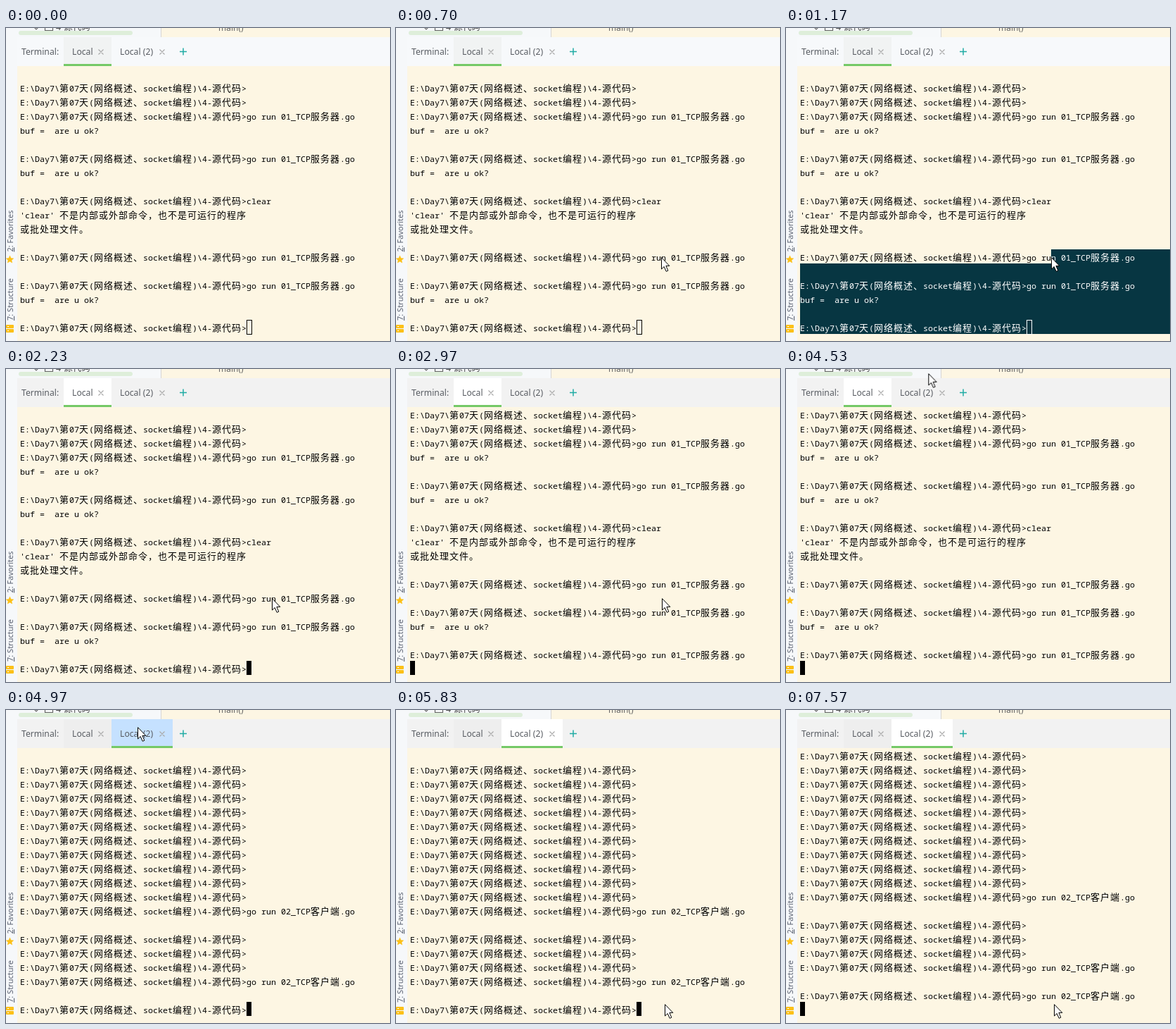
Write an HTML page that moves like this. It is 546 by 444 pixels and loops after 8000 ms.

```html
<!DOCTYPE html>
<html lang="zh">
<head>
<meta charset="utf-8">
<title>Terminal</title>
<style>
  html, body { margin: 0; width: 100%; height: 100%; overflow: hidden; background: #fdf6e3; }
  #stage { position: relative; width: 546px; height: 444px; overflow: hidden; background: #fdf6e3; }
  #stage > *, .view { position: absolute; }

  /* every moving part shares one 8 s clock; most changes are hard */
  .view, .typed, #caret, #mouse, #head, #tab1, #tab2, #line {
    animation-duration: 8s; animation-iteration-count: infinite; animation-timing-function: step-end;
  }

  #chrome { left: 0; top: 0; font-family: "Noto Sans", "Open Sans", "Noto Sans CJK SC", sans-serif; }
  .label { font-size: 12.2px; fill: #595d63; }
  .side { font-size: 11px; fill: #596070; }
  .num { text-decoration: underline; }

  #term { left: 15px; top: 54px; width: 531px; height: 390px; overflow: hidden; }
  .view { inset: 0; color: #000; font: 500 11.667px "Noto Sans Mono", "DejaVu Sans Mono", monospace; }
  .view p { margin: 0; padding-left: 5px; height: 20px; line-height: 23px; white-space: pre; }
  .view b { font: 13px "Noto Sans CJK TC", "Noto Sans CJK SC", sans-serif; line-height: 0; letter-spacing: 1px; }
  .typed { font-style: normal; }
  #server { animation-name: server; }
  #client { animation-name: client; }
  #server .typed { animation-name: typeServer; }
  #client .typed { animation-name: typeClient; }
  #picked {
    animation-name: picked; background: #073642; color: #fff;
    clip-path: polygon(362px 260px, 531px 260px, 531px 380px, 5px 380px, 5px 280px, 362px 280px);
  }
  #picked .typed { opacity: 0; }

  #caret { left: 0; top: 414px; box-sizing: border-box; border: 1px solid #000; animation-name: caret; }
  #mouse { left: -1px; top: -1px; overflow: visible; animation-name: path, appear; animation-timing-function: linear, step-end; }
  #head { animation-name: head; }
  #tab1 { animation-name: tab1; }
  #tab2 { animation-name: tab2; }
  #line { left: 0; top: 51px; height: 3px; background: #75c967; animation-name: line; }

  @keyframes server {
    0% { opacity: 1; transform: none; }
    37.125% { transform: translateY(-20px); }
    60.875%, 100% { opacity: 0; }
  }
  @keyframes client {
    0% { opacity: 0; transform: none; }
    60.875% { opacity: 1; }
    94.625%, 100% { transform: translateY(-20px); }
  }
  @keyframes typeServer { 0% { opacity: 0; } 28.75%, 100% { opacity: 1; } }
  @keyframes typeClient { 0% { opacity: 0; } 87.5%, 100% { opacity: 1; } }
  @keyframes picked { 0% { opacity: 0; } 14.625% { opacity: 1; } 15%, 100% { opacity: 0; } }

  @keyframes caret {
    0% { transform: translateX(342px); width: 8px; height: 21px; background: transparent; border-color: #000; opacity: 1; }
    14.625% { border-color: #fff; }
    15% { width: 7px; height: 20px; background: #000; border-color: #000; }
    20.875% { opacity: 0; }
    27.875% { opacity: 1; }
    28.75% { transform: translateX(496px); }
    35.375% { opacity: 0; }
    37.125% { transform: translateX(20px); opacity: 1; }
    46% { opacity: 0; }
    53% { opacity: 1; }
    60.875% { transform: translateX(342px); width: 8px; height: 21px; background: transparent; }
    62.125% { width: 7px; height: 20px; background: #000; }
    75% { opacity: 0; }
    81.625% { opacity: 1; }
    87.5% { transform: translateX(496px); }
    93.75% { opacity: 0; }
    94.625%, 100% { transform: translateX(20px); width: 7px; height: 20px; background: #000; border-color: #000; opacity: 1; }
  }

  @keyframes appear { 0% { opacity: 0; } 3.75%, 100% { opacity: 1; } }
  @keyframes path {
    0%, 3.75% { transform: translate(518px, 217px); }
    6.25% { transform: translate(420px, 300px); }
    7.75% { transform: translate(360px, 335px); animation-timing-function: ease-out; }
    8.75%, 18.37% { transform: translate(378px, 326px); }
    18.375%, 43.74% { transform: translate(379px, 326px); }
    43.75%, 44.12% { transform: translate(378px, 318px); }
    44.125%, 45.5% { transform: translate(376px, 312px); animation-timing-function: ease-in-out; }
    50%, 52.6% { transform: translate(240px, 116px); }
    55% { transform: translate(222px, 40px); }
    56.5% { transform: translate(205px, 5px); animation-timing-function: ease-out; }
    58.75%, 65% { transform: translate(188px, 25px); animation-timing-function: ease-in; }
    68.5% { transform: translate(305px, 240px); }
    70.75% { transform: translate(390px, 398px); animation-timing-function: ease-out; }
    72.875%, 74.99% { transform: translate(383px, 418px); }
    75%, 100% { transform: translate(382px, 418px); }
  }

  /* the header is paler until the terminal takes the focus */
  @keyframes head { 0% { fill: #f7f9fb; } 15%, 100% { fill: #f2f2f2; } }
  @keyframes tab1 { 0% { fill: #f1f3f3; } 15% { fill: #fff; } 60.875%, 100% { fill: #eee; } }
  @keyframes tab2 { 0% { fill: transparent; } 58% { fill: #c5e1ff; } 66.25%, 100% { fill: #fff; } }
  @keyframes line {
    0% { transform: translateX(82px); width: 68px; }
    60.875%, 100% { transform: translateX(150px); width: 87px; }
  }
</style>
</head>
<body>
<div id="stage">
  <div id="term">
    <div class="view" id="server"></div>
    <div class="view" id="picked"></div>
    <div class="view" id="client"></div>
  </div>
  <div id="caret"></div>

  <svg id="chrome" width="546" height="444">
    <!-- project tree and editor edge -->
    <rect width="220" height="14" fill="#f6f8fa"/>
    <rect y="13" width="16" height="431" fill="#f6f8fa"/>
    <rect x="18" y="4" width="162" height="6" rx="3" fill="#deeeda"/>
    <path d="M220.5 0V13" stroke="#d5d5d5"/>
    <path d="M40 -1L43 2L46 -1M55.5 -4V3.5H66.5V-4" fill="none" stroke="#666" stroke-width="1.2"/>
    <text x="71" y="3.4" font-size="12.5" fill="#444">4-源代码</text>
    <text x="302" y="4.4" font-size="12" fill="#666">main()</text>

    <!-- terminal header -->
    <rect id="head" x="16" y="13" width="530" height="41"/>
    <rect id="tab1" x="82" y="13" width="68" height="41"/>
    <rect id="tab2" x="150" y="13" width="87" height="41"/>
    <g class="label">
      <text x="22" y="38">Terminal:</text>
      <text x="94" y="38">Local</text>
      <text x="162" y="38">Local (2)</text>
    </g>
    <path d="M131.5 30.5l7 7m0 -7l-7 7M218.5 30.5l7 7m0 -7l-7 7" stroke="#aaa" stroke-width="1.2"/>
    <path d="M247 33.5h10M252 28.5v10" stroke="#21aca5" stroke-width="1.5"/>

    <!-- side bar -->
    <g class="side">
      <text transform="translate(10 317.5) rotate(-90)"><tspan class="num">2</tspan>: Favorites</text>
      <text transform="translate(10 415) rotate(-90)"><tspan class="num">7</tspan>: Structure</text>
    </g>
    <g fill="#fcc017">
      <path d="M5.5 322.5l1.7 3.8 4.1.4 -3.1 2.7 .9 4 -3.6-2.1 -3.6 2.1 .9-4 -3.1-2.7 4.1-.4z"/>
      <rect y="421" width="11" height="5" rx="1"/>
      <rect y="427" width="11" height="5" rx="1"/>
    </g>
    <path d="M2 423.5h2M2 429.5h2" stroke="#fff"/>
  </svg>

  <div id="line"></div>
  <svg id="mouse" width="13" height="22">
    <path d="M.5 .7V17L4.2 13.5L7.2 20.3L9.8 19.2L6.9 12.4H11.8Z" fill="#fff" stroke="#000"/>
  </svg>
</div>

<script>
  const prompt = 'E:\\Day7\\第07天(网络概述、socket编程)\\4-源代码>';
  const runServer = 'go run 01_TCP服务器.go';
  const runClient = 'go run 02_TCP客户端.go';
  const reply = 'buf =  are u ok?';

  // CJK runs get their own font so that they fill two cells per character
  const cells = s => s.replace(/[^\x00-\x7f]+/g, '<b>$&</b>');
  const row = s => `<p>${cells(s)}</p>`;

  function fill(id, lines, command) {
    document.getElementById(id).innerHTML = lines.map(row).join('') +
      `<p>${cells(prompt)}<i class="typed">${cells(command)}</i></p>`;
  }

  const serverLines = [
    '', prompt, prompt,
    prompt + runServer, reply, '',
    prompt + runServer, reply, '',
    prompt + 'clear', "'clear' 不是内部或外部命令，也不是可运行的程序", '或批处理文件。', '',
    prompt + runServer, '',
    prompt + runServer, reply, ''
  ];
  const clientLines = [
    '', ...Array(10).fill(prompt),
    prompt + runClient, '',
    prompt, prompt, prompt,
    prompt + runClient, ''
  ];

  fill('server', serverLines, runServer);
  fill('picked', serverLines, runServer);
  fill('client', clientLines, runClient);
</script>
</body>
</html>
```
